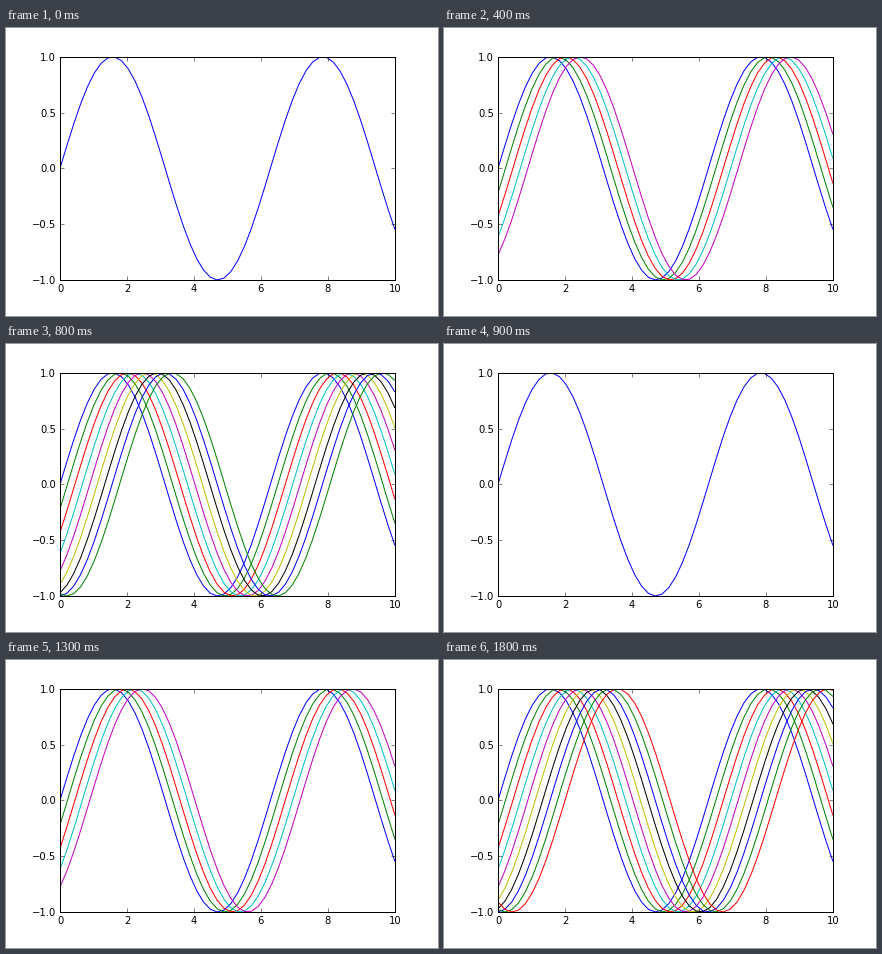
These frames come from a looping animation (432x288 px, 1900 ms). A matplotlib script:

```python
import matplotlib.pyplot as plt
import numpy as np
from matplotlib.animation import FuncAnimation

CURVES = 10
FRAMES = 19
FIRST_RUN = 9  # the first build-up stops one curve short

plt.rcParams.update({
    "font.family": "DejaVu Sans",
    "font.size": 10,
    "axes.linewidth": 1.0,
    "axes.axisbelow": False,
    "lines.linewidth": 1.0,
})

fig = plt.figure(figsize=(6, 4), dpi=72, facecolor="white")
ax = fig.add_axes([0.125, 0.125, 0.775, 0.775])
ax.set(xlim=(0, 10), ylim=(-1, 1),
       xticks=np.arange(0, 11, 2), yticks=np.arange(-1, 1.1, 0.5))
ax.tick_params(direction="in", top=True, right=True,
               length=4, width=0.5, pad=4)

x = np.linspace(0, 10, 50)
lines = [ax.plot(x, np.sin(x - phase), color="bgrcmyk"[i % 7])[0]
         for i, phase in enumerate(np.linspace(0, 2, CURVES))]


def update(frame):
    """Show one more curve per step, starting over after the first run."""
    step = frame if frame < FIRST_RUN else frame - FIRST_RUN
    for i, line in enumerate(lines):
        line.set_visible(i <= step)
    return lines


anim = FuncAnimation(fig, update, frames=FRAMES, interval=100,
                     init_func=lambda: update(0), repeat=True, repeat_delay=0)
plt.show()
```
